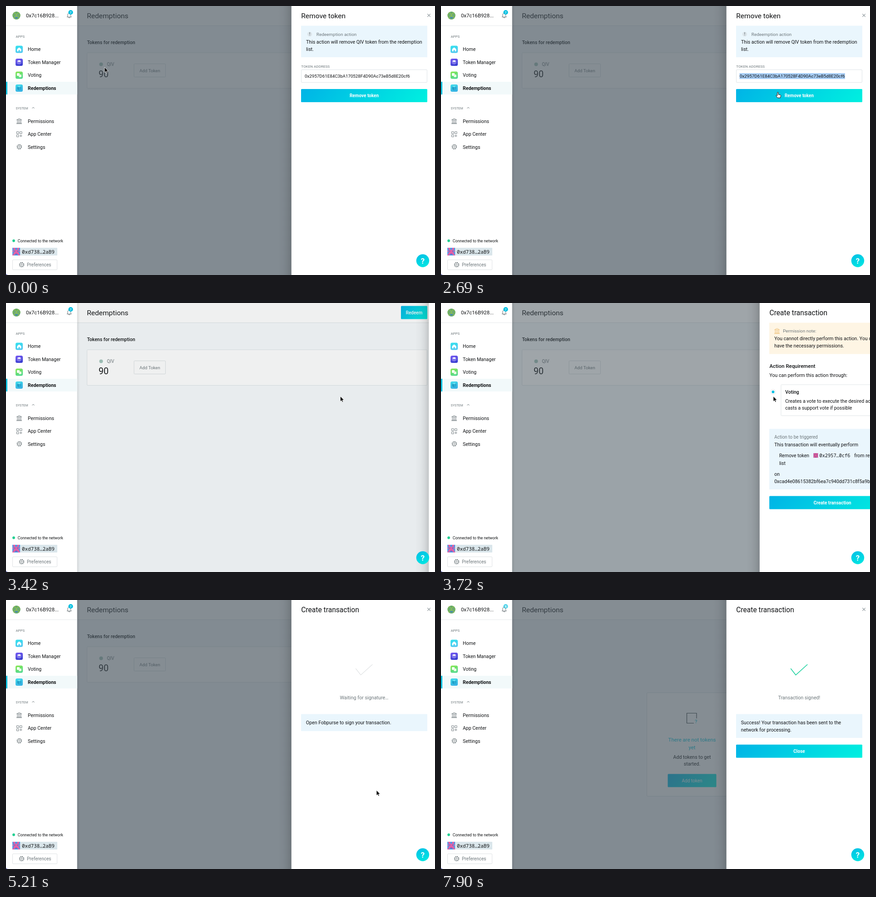
An HTML page for the animation above (8000 ms loop, 945 by 593 pixels).

```html
<!DOCTYPE html>
<html lang="en">
<head>
<meta charset="utf-8">
<title>Token redemption</title>
<style>
html, body { margin: 0; width: 100%; height: 100%; overflow: hidden; background: #fff; }
svg { display: block; width: 100vw; height: 100vh; }
text { font-family: Roboto, "Open Sans", sans-serif; }
.mono { font-family: "Noto Sans Mono", "DejaVu Sans Mono", monospace; }
.mid { text-anchor: middle; }
.med { font-weight: 500; }
.bold { font-weight: 700; }
</style>
</head>
<body>
<svg id="stage" viewBox="0 0 945 593" xmlns="http://www.w3.org/2000/svg"></svg>
<script>
const INK = '#101214', GREY = '#6d777b', INFO = '#eaf6fd';
const TOKEN = 'QIV', WALLET = 'Fobpurse';
const TOKEN_ADDR = '0x2957D61E84C3bA170528F4D90Ac73eB5d8E20cf6';
const TOKEN_SHORT = '0x2957…0cf6';
const VOTE_ADDR = '0xcad4e08615382bf6ea7c940dd731c8f5a9b14f62';

const rect = (x, y, w, h, fill, more = '') =>
  `<rect x="${x}" y="${y}" width="${w}" height="${h}" fill="${fill}" ${more}/>`;
const frame = (x, y, w, h, stroke, fill = '#fff') =>
  rect(x, y, w, h, fill, `stroke="${stroke}" rx="1.5"`);
const circle = (x, y, r, fill, more = '') =>
  `<circle cx="${x}" cy="${y}" r="${r}" fill="${fill}" ${more}/>`;
const line = (d, stroke, w = 1, more = '') =>
  `<path d="${d}" fill="none" stroke="${stroke}" stroke-width="${w}" ${more}/>`;
const text = (x, y, s, size = 10.6, fill = INK, cls = '') =>
  `<text x="${x}" y="${y}" font-size="${size}" fill="${fill}" class="${cls}">${s}</text>`;
const group = (id, body, more = '') => `<g id="${id}" ${more}>${body}</g>`;
const at = (x, y, body) => `<g transform="translate(${x} ${y})">${body}</g>`;

// 130 degree cyan gradient in button space
function gradient(w, h) {
  const a = 130 * Math.PI / 180, sx = Math.sin(a), sy = -Math.cos(a);
  const half = (w * sx + h * sy) / 2;
  return `<linearGradient id="btn${w}" gradientUnits="userSpaceOnUse"
    x1="${w / 2 - sx * half}" y1="${h / 2 - sy * half}"
    x2="${w / 2 + sx * half}" y2="${h / 2 + sy * half}">
    <stop stop-color="#00b4e6"/><stop offset="1" stop-color="#00f0e0"/></linearGradient>`;
}
const button = (x, y, w, label, cls = 'bold') => at(x, y,
  rect(0, 0, w, 29, `url(#btn${w})`, 'rx="1.5"') +
  text(w / 2, 18.2, label, 10, '#fff', 'mid ' + cls));

const tint = (id, a, b) => `<linearGradient id="${id}" x2="0.4" y2="1">
  <stop stop-color="${a}"/><stop offset="1" stop-color="${b}"/></linearGradient>`;

const defs = `<defs>
  ${gradient(278, 29)}${gradient(58, 29)}${gradient(107, 29)}
  ${tint('home', '#32e4ee', '#50c8f0')}${tint('cube', '#7a5cf5', '#3a3fd0')}
  ${tint('vote', '#8be84f', '#52d98a')}${tint('redeem', '#3fdcea', '#37b3e4')}
  ${tint('help', '#00bfe6', '#00e2e2')}
  <linearGradient id="shade"><stop stop-opacity="0"/><stop offset=".4" stop-opacity=".03"/>
    <stop offset=".7" stop-opacity=".08"/><stop offset="1" stop-opacity=".17"/></linearGradient>
  <linearGradient id="edge"><stop stop-opacity=".1"/><stop offset="1" stop-opacity="0"/></linearGradient>
  <clipPath id="face"><circle cx="23" cy="21" r="8.7"/></clipPath>
</defs>`;

const bank = (x, y, c) => at(x, y, line(
  'M-5.5-2.5L0-5.5 5.5-2.5ZM-5.5 4.5H5.5M-6 6H6M-4-2V4M-1.4-2V4M1.4-2V4M4-2V4', c, .9));
const gear = (x, y, c) => at(x, y,
  circle(0, 0, 4.1, 'none', `stroke="${c}"`) + circle(0, 0, 1.7, 'none', `stroke="${c}" stroke-width=".9"`) +
  circle(0, 0, 5.1, 'none', `stroke="${c}" stroke-width="1.3" stroke-dasharray="2 2.005"`));

// Mirrored block avatar
function blocks(x, y, size, back, front, spot) {
  const u = size / 8;
  const cell = (cx, cy, w, h, c) => rect(x + cx * u, y + cy * u, w * u, h * u, c);
  return rect(x, y, size, size, back) +
    cell(1, 0, 2, 2, front) + cell(5, 0, 2, 2, front) + cell(2, 2, 4, 4, front) +
    cell(0, 3, 2, 1, front) + cell(6, 3, 2, 1, front) + cell(1, 5, 6, 2, front) +
    cell(2, 3, 1, 1, spot) + cell(5, 3, 1, 1, spot) + cell(3, 6, 2, 1, spot) +
    cell(0, 7, 2, 1, front) + cell(6, 7, 2, 1, front);
}

function sidebar() {
  const apps = ['Home', 'Token Manager', 'Voting', 'Redemptions'];
  const tools = ['Permissions', 'App Center', 'Settings'];
  const tile = (i, id, art) => at(21, 87.5 + 28.5 * i, rect(0, 0, 16, 16, `url(#${id})`, 'rx="3.5"') + art);
  return rect(156, 0, 7, 593, 'url(#edge)') + rect(0, 0, 156.7, 593, '#fff') +
    line('M0 43.5H156.7', '#e6e9eb') +
    `<g clip-path="url(#face)">${blocks(14, 12, 18, '#62a869', '#84b95c', '#4a8fa6')}
      ${rect(19, 24, 8, 2, '#4a8fa6')}</g>` +
    text(44, 25, '0x7c16B928...', 11.3) +
    line('M134.5 24.2C136.3 22.8 135.7 21 136 18.8 136.4 14.6 142 14.6 142.5 18.8 142.8 21 142.2 22.8 144 24.2ZM137.6 25C138 26.7 140.6 26.7 141 25', '#5d666a') +
    group('badge', circle(142.5, 14, 5.1, '#00bfe0') +
      `<text id="count" x="142.5" y="16.6" font-size="7" fill="#fff" class="mid med"></text>`) +
    text(21.5, 69.6, 'APPS', 7.8, GREY) +
    rect(0, 167, 156.7, 28, '#f2f9fa') + rect(0, 167, 3, 28, '#08c4e4') +
    tile(0, 'home', `<path d="M3.5 7.6L8 3.7 12.5 7.6V12.5H9.4V9.4H6.6V12.5H3.5Z" fill="#fff"/>`) +
    tile(1, 'cube', `<path d="M3.2 5.5L8 3.2 12.8 5.5 8 7.8Z" fill="#fff"/>
      <path d="M3.2 6.3L8 8.6 12.8 6.3V10.5L8 12.9 3.2 10.5Z" fill="#b0a5f8" opacity=".55"/>`) +
    tile(2, 'vote', rect(3, 3.4, 6, 6, '#fff', 'rx="1.2"') + rect(7.2, 6.6, 5.8, 6, '#e7fbe0', 'rx="1.2"')) +
    tile(3, 'redeem', `<path d="M3.5 5L8 6.4V12.8L3.5 10.8Z" fill="#1f9fc6"/>
      <path d="M8.8 6.4L12.5 4.2V10.4L8.8 12.8Z" fill="#2aa9d0"/><path d="M4.2 4.1L8 3 11.8 3.6 8.2 5.2Z" fill="#83eef2"/>`) +
    apps.map((s, i) => text(48, 99.3 + 28.5 * i, s, 10.5, INK, i == 3 ? 'bold' : '')).join('') +
    text(21.5, 228, 'SYSTEM', 7.1, GREY) + line('M57.5 225.6L60 223.4 62.5 225.6', GREY) +
    tools.map((s, i) => text(48, 257.5 + 28.5 * i, s, 10.5)).join('') +
    bank(29, 253.5, GREY) + gear(29.3, 310.5, GREY) +
    line('M23.5 277H28V281.5H23.5ZM30.5 277H35V281.5H30.5ZM23.5 284H28V288.5H23.5ZM32.8 283.5V289M30 286.2H35.5', GREY, .9) +
    circle(17, 517.5, 2.9, '#21cf92') + text(25.8, 520.8, 'Connected to the network', 8.75) +
    rect(14, 533, 99, 17, '#dae6eb', 'rx="1"') + blocks(14, 533, 17, '#4a9bea', '#e460a4', '#6a62c8') +
    text(35, 545.5, '0xd738…2aB9', 10.9, INK, 'mono') +
    frame(14.5, 559.5, 98, 22, '#dfe3e5') + gear(34.5, 570.3, GREY) +
    text(46, 574, 'Preferences', 10, GREY) +
    '<path d="M0 590Q1 592.5 4 593H0Z" fill="#6a6cc0"/>';
}

function app() {
  const list = text(178.5, 84, 'Tokens for redemption', 10.5, INK, 'med') +
    frame(178.5, 103, 749, 78.5, '#dfe6e9') + circle(209.5, 128.5, 4, '#a3c6bc') +
    text(222.3, 132, TOKEN, 10, GREY) + text(204, 156.5, '90', 19.5) +
    frame(282, 127.5, 69.3, 29, '#dbe0e3') + text(316.8, 145.8, 'Add Token', 9.7, GREY, 'mid');
  const cyan = '#00c4dc';
  const empty = frame(453.5, 204.5, 199, 228, '#dbe2e6') +
    line('M557 271.5H541.5V249.5H563V261', '#333b40', 1.2) + text(561.7, 271.5, '?', 11.5, cyan, 'mid') +
    text(553, 312.2, 'There are not tokens', 11.5, cyan, 'mid') + text(553, 329, 'yet', 11.5, cyan, 'mid') +
    text(553, 349.5, 'Add tokens to get', 10.6, INK, 'mid') + text(553, 365, 'started.', 10.6, INK, 'mid') +
    button(499.5, 383.5, 107, 'Add token', '');
  return rect(156, 0, 789, 593, '#f7fbfd') + rect(156, 0, 789, 43, '#fff') +
    line('M156 43.5H945', '#dfe5e8') + text(178.3, 26.5, 'Redemptions', 15.5) +
    button(870, 6.5, 58, 'Redeem', 'med') + group('list', list) + group('empty', empty);
}

const info = (y, h, fill = INFO) => rect(650, y, 278, h, fill);

const removeView = () => text(650.3, 26.5, 'Remove token', 15.5) + info(43.5, 69.5) +
  circle(669, 62, 5.2, '#dce5ea') + text(669, 65.2, '!', 9, '#6f7a80', 'mid bold') +
  text(683.8, 65.8, 'Redeemption action', 9.95, GREY) +
  text(661, 83, `This action will remove ${TOKEN} token from the redemption`) + text(661, 98.7, 'list.') +
  text(650.3, 136.2, 'TOKEN ADDRESS', 8.1, GREY) + frame(650.5, 140.5, 277, 28, '#dfe4e8') +
  group('mark', rect(657.5, 148, 232.5, 13, '#a9cff7')) + text(658, 158.4, TOKEN_ADDR, 9.77) +
  button(650, 183, 278, 'Remove token');

const createView = () => info(43.5, 69, '#fef5e4') + bank(667, 61.5, '#eebf74') +
  text(680, 65.3, 'Permission note:', 9.8, GREY) +
  text(661, 82.2, 'You cannot directly perform this action. You do not') +
  text(661, 98, 'have the necessary permissions.') +
  text(650.3, 142.6, 'Action Requirement', 11.4, INK, 'med') +
  text(650.3, 162.7, 'You can perform this action through:') +
  circle(658.3, 196, 5.5, '#fff', 'stroke="#dfe6ea"') + circle(658.3, 196, 3, '#02bfe2') +
  frame(675.8, 180, 252, 68.5, '#e0e5e8') + text(685, 200.4, 'Voting', 10.5, INK, 'med') +
  text(685, 219.7, 'Creates a vote to execute the desired action, and') +
  text(685, 235.4, 'casts a support vote if possible') +
  info(277.5, 133.5) + text(661, 299, 'Action to be triggered', 10, GREY) +
  text(661, 316, 'This transaction will eventually perform') +
  text(671.7, 339.6, 'Remove token', 10.5) + blocks(747.3, 331, 10, '#b04aa8', '#e0608e', '#6a4fb0') +
  text(760.3, 339.6, TOKEN_SHORT, 10.3, INK, 'mono') + text(837, 339.6, 'from redemption') +
  text(671.7, 357.2, 'list') + text(661, 381, 'on') + text(661, 396.6, VOTE_ADDR + '.', 10.5) +
  button(650, 425.5, 278, 'Create transaction');

const tick = (c, w) => line('M770.3 151L781.5 165.3 807.3 142', c, w);
const waitView = () => tick('#cfd3d5', 1) + text(789, 219.3, 'Waiting for signature…', 10.8, GREY, 'mid') +
  info(251.5, 37.5) + text(660.8, 274, `Open ${WALLET} to sign your transaction.`);
const doneView = () => tick('#1fd2a0', 1.6) + text(789, 219.3, 'Transaction signed!', 10.6, GREY, 'mid') +
  info(251.5, 52.5) + text(660.8, 274, 'Success! Your transaction has been sent to the') +
  text(660.8, 289.7, 'network for processing.') + button(650, 318.8, 278, 'Close');

const panel = () => rect(599, 0, 30, 593, 'url(#shade)') + rect(628.7, 0, 330, 593, '#fff') +
  line('M928.3 17.3L934.8 23.8M934.8 17.3L928.3 23.8', '#8d969b', 1.2) +
  group('remove', removeView()) +
  group('signer', text(650.3, 26.5, 'Create transaction', 15.6) +
    group('create', createView()) + group('wait', waitView()) + group('done', doneView()));

const pointer = () =>
  group('arrow', '<path d="M0 0V11.5L2.7 9 4.4 12.8 6.3 12 4.6 8.3H8.2Z" fill="#000" stroke="#fff" stroke-width=".8"/>') +
  group('beam', line('M-2-6Q0-6 0-4.5V4.5Q0 6-2 6M2-6Q0-6 0-4.5M0 4.5Q0 6 2 6', '#222')) +
  group('hand', '<path d="M-1.2 1.2a1.2 1.2 0 0 1 2.4 0V5l4 .8c1.3.3 1.6 1 1.4 2.2L5.6 12.5H-.6L-3.7 8.2c-.8-1.2.6-2 1.5-1.1l1 .9Z" fill="#fff" stroke="#111"/>');

const stage = document.getElementById('stage');
stage.innerHTML = defs + app() + group('veil', rect(156, 0, 789, 593, 'rgb(68,81,89)')) +
  group('panel', panel()) + sidebar() +
  circle(918, 561.5, 14.2, 'url(#help)') +
  text(918, 567.5, '?', 17, '#fff', 'mid bold') + group('cursor', pointer());

const el = {};
stage.querySelectorAll('[id]').forEach(n => el[n.id] = n);
const show = (id, on) => el[id].setAttribute('display', on ? 'inline' : 'none');

const spring = x => x <= 0 ? 0 : 1 - Math.exp(-x) * (1 + x);
const openness = t => Math.max(1 - spring((t - 2950) * .00755), spring((t - 3450) * .0108));

// Pointer stops: time, x, y
const path = [[80, 217, 135], [750, 770, 154], [1250, 770, 154], [1940, 742, 190], [3050, 742, 190],
  [3420, 736.4, 205.7], [3720, 732, 205.7], [3850, 732, 206], [4470, 780.5, 422], [4910, 788, 437],
  [5060, 788, 437], [5650, 960, 330]];
function pointerAt(t) {
  const i = path.findIndex(k => k[0] > t);
  if (i == 0) return path[0].slice(1);
  if (i < 0) return path[path.length - 1].slice(1);
  const [a, b] = [path[i - 1], path[i]];
  const u = (t - a[0]) / (b[0] - a[0]), e = u * u * (3 - 2 * u);
  return [a[1] + (b[1] - a[1]) * e, a[2] + (b[2] - a[2]) * e];
}
function pointerKind(t) {
  if (t < 620) return 'arrow';
  if (t < 1700) return 'beam';
  if (t < 3050) return 'hand';
  return t > 4600 && t < 5060 ? 'hand' : 'arrow';
}

function draw(t) {
  const p = openness(t), kind = pointerKind(t);
  el.veil.setAttribute('opacity', .65 * p);
  el.panel.setAttribute('transform', `translate(${348 * (1 - p)} 0)`);
  show('mark', t >= 1200);
  show('remove', t < 3470);
  show('signer', t >= 3470);
  show('create', t < 5060);
  show('wait', t >= 5060 && t < 7600);
  show('done', t >= 7600);
  show('list', t < 7150);
  show('empty', t >= 7150);
  el.count.textContent = t < 7750 ? '7' : '8';
  el.badge.setAttribute('opacity', t < 7750 ? 1 : .65);
  ['arrow', 'beam', 'hand'].forEach(k => show(k, k == kind));
  el.cursor.setAttribute('transform', `translate(${pointerAt(t).join(' ')})`);
}

const start = performance.now();
function play() {
  draw((performance.now() - start) % 8000);
  requestAnimationFrame(play);
}
play();
</script>
</body>
</html>
```
